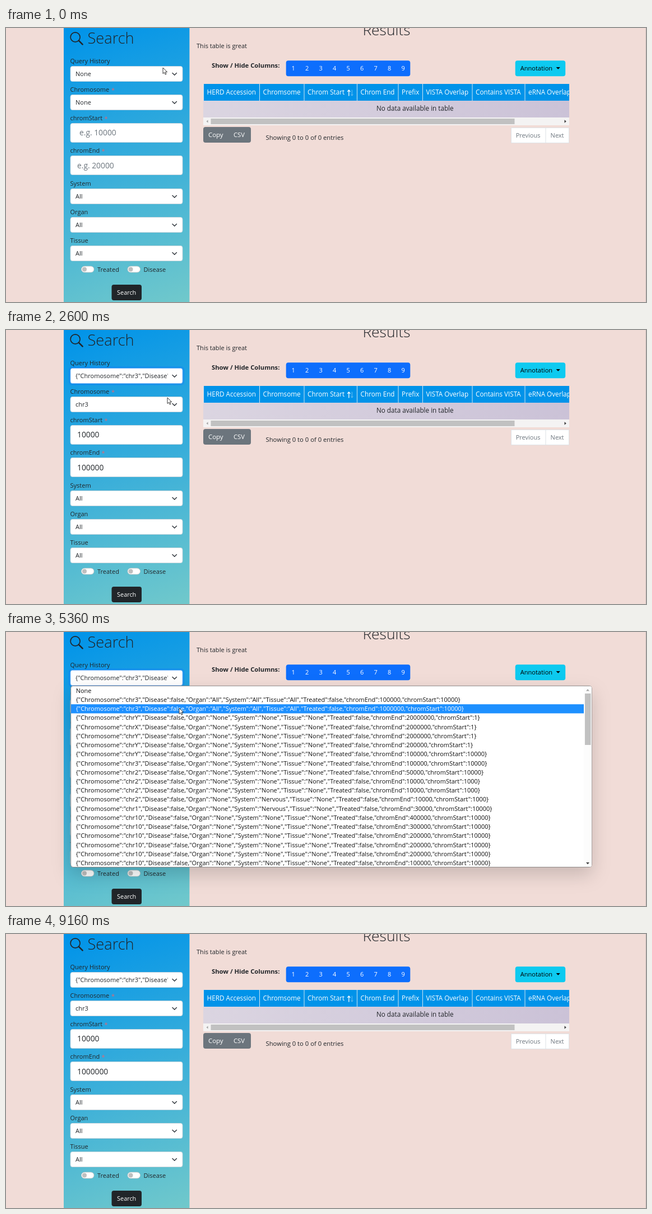
These frames come from a looping animation (1142x490 px, 9.26 s). An HTML page:

```html
<!DOCTYPE html>
<html lang="en">
<head>
<meta charset="utf-8">
<title>Search results</title>
<style>
html, body { margin: 0; width: 100%; height: 100%; overflow: hidden; background: #f1dcd7; }
svg { display: block; width: 1142px; height: 490px; font-family: "Open Sans", "Noto Sans", sans-serif; }
text { white-space: pre; }
#menuBox { filter: drop-shadow(0 13px 16px rgba(0, 0, 0, .17)); }
</style>
</head>
<body>
<svg id="stage" viewBox="0 0 1142 490">
  <defs>
    <linearGradient id="panelFill" gradientUnits="userSpaceOnUse" x1="110" y1="2" x2="317" y2="571">
      <stop offset="0" stop-color="#0093e9"/><stop offset="1" stop-color="#80d0c7"/>
    </linearGradient>
    <linearGradient id="rowFill">
      <stop offset="0" stop-color="#dbd5e1"/><stop offset="1" stop-color="#cbc2d7"/>
    </linearGradient>
    <clipPath id="tableClip"><rect x="352" y="100" width="653" height="74"/></clipPath>
    <clipPath id="valueClip"><rect x="120" y="68" width="168.5" height="28"/></clipPath>
    <clipPath id="menuClip"><rect x="116" y="97" width="929" height="323" rx="3"/></clipPath>
  </defs>
</svg>
<script>
const NS = 'http://www.w3.org/2000/svg';
const stage = document.getElementById('stage');
const INK = '#212529';
const LOOP = 9260;

function add(tag, attrs, parent = stage) {
  const el = document.createElementNS(NS, tag);
  for (const k in attrs) el.setAttribute(k, attrs[k]);
  parent.append(el);
  return el;
}
const box = (x, y, w, h, fill, more = {}, parent) =>
  add('rect', { x, y, width: w, height: h, fill, ...more }, parent);
const line = (d, stroke, width, parent) =>
  add('path', { d, fill: 'none', stroke, 'stroke-width': width, 'stroke-linecap': 'round', 'stroke-linejoin': 'round' }, parent);
const shape = (d, fill, parent) => add('path', { d, fill }, parent);
function label(str, x, y, size = 11, fill = INK, more = {}, parent) {
  const el = add('text', { x, y, 'font-size': size, fill, ...more }, parent);
  el.textContent = str;
  return el;
}
const show = (el, on) => el.setAttribute('visibility', on ? 'visible' : 'hidden');
const MID = { 'text-anchor': 'middle' };

// Search panel
box(103, -10, 224.4, 520, 'url(#panelFill)', { rx: 4 });
add('circle', { cx: 123.6, cy: 16.4, r: 8.5, fill: 'none', stroke: INK, 'stroke-width': 1.6 });
line('M130.4 23.2L136.6 29.4', INK, 2.6);
label('Search', 145.5, 28, 27.2, INK, { 'font-weight': 300 });

const glow = box(113, 66.5, 204, 31, 'none', { rx: 5, stroke: '#0d6efd', 'stroke-opacity': .25, 'stroke-width': 3 });

function field(name, y, h, star) {
  label(name, 114.5, y - 4.6);
  if (star) label('*', star, y - 4.2, 11, '#dd6878');
  return box(115, y + .5, 200, h - 1, '#fff', { rx: 3.5, stroke: '#ced4da', 'stroke-width': .8 });
}
function select(name, y, value, star) {
  const frame = field(name, y, 28, star);
  line(`M297 ${y + 12.5}l3.7 3.7 3.7-3.7`, '#343a40', 1.5);
  return { frame, text: label(value, 124, y + 18) };
}
const query = select('Query History', 68, 'None');
query.text.setAttribute('clip-path', 'url(#valueClip)');
const chrom = select('Chromosome', 119, 'None', 188).text;
field('chromStart', 170, 35, 175.5);
field('chromEnd', 228, 35, 170.5);
const startText = label('', 131, 192.4, 13.8);
const endText = label('', 127, 250.6, 13.8);
select('System', 287, 'All');
select('Organ', 338, 'All');
select('Tissue', 389, 'All');

for (const [name, x] of [['Treated', 134], ['Disease', 216.5]]) {
  box(x + .5, 426, 22.5, 11, '#fff', { rx: 5.5, stroke: '#bfbfbf', 'stroke-width': .8 });
  add('circle', { cx: x + 6, cy: 431.5, r: 4, fill: '#bfbfbf' });
  label(name, x + 29, 435.6);
}
box(188.5, 459, 53.5, 28, INK, { rx: 4 });
label('Search', 215.2, 477, 10.9, '#fff', MID);

// Results
label('Results', 679, 13, 26.4, INK, { 'font-weight': 300, ...MID });
label('This table is great', 340, 36.3, 11.05);
label('Show / Hide Columns:', 367, 71.4, 11.25, INK, { 'font-weight': 700 });
box(499.7, 58.3, 221.6, 28, '#0d6efd', { rx: 4 });
for (let i = 0; i < 9; i++) label(i + 1, 512.6 + i * 24.5, 76.2, 11, '#fff', MID);
box(908.7, 58.3, 89.5, 28, '#0dcaf0', { rx: 4 });
label('Annotation', 917.7, 76.2, 11.05, '#000');
shape('M981.5 70h7.4l-3.7 3.8z', '#000');

const table = add('g', { 'clip-path': 'url(#tableClip)' });
box(352, 100, 653, 30, '#0093e9', {}, table);
box(352, 130, 653, 30, 'url(#rowFill)', {}, table);
const columns = [['HERD Accession', 352], ['Chromsome', 452], ['Chrom Start', 531.5], ['Chrom End', 626],
  ['Prefix', 699.5], ['VISTA Overlap', 743], ['Contains VISTA', 831.5], ['eRNA Overlap', 925.5]];
for (const [name, x] of columns) {
  box(x, 100, 1, 30, '#d5e6f2', {}, table);
  label(name, x + 6.6, 119.3, 11.7, '#fff', {}, table);
}
line('M611.8 121v-10m-2.3 2.6l2.3-2.6 2.3 2.6', '#fff', 1.3, table);
line('M617.4 111v10m-1.8-2.2l1.8 2.2 1.8-2.2', '#6fbef0', 1, table);
label('No data available in table', 729.8, 148.3, 11.7, INK, MID, table);
box(352, 160, 653, 14, '#f4f3f3', {}, table);
box(365.5, 162, 542, 10, '#c1c1c1', {}, table);
shape('M360.5 164.5v5l-3-2.5z', '#a3a3a3', table);
shape('M996.5 164.3v5.4l3.4-2.7z', '#404040', table);

box(352, 177, 85, 28, '#6c757d', { rx: 4 });
label('Copy', 361, 195.3, 11.4, '#fff');
label('CSV', 406, 195.3, 11.2, '#fff');
label('Showing 0 to 0 of 0 entries', 463.5, 199.7, 11.25);
box(901.5, 178.5, 103, 27, '#fff', { stroke: '#dee2e6' });
box(962.5, 178, 1, 28, '#dee2e6');
label('Previous', 909.7, 196.3, 11, '#6c757d');
label('Next', 971.6, 196.3, 11, '#6c757d');
box(1141, 0, 1, 490, '#d8c6c2');

// History menu
const entry = (chr, kind, end, start, system = kind) =>
  `{"Chromosome":"chr${chr}","Disease":false,"Organ":"${kind}","System":"${system}","Tissue":"${kind}",` +
  `"Treated":false,"chromEnd":${end},"chromStart":${start}}`;
const plain = (chr, end, start, system) => entry(chr, 'None', end, start, system);
const options = ['None',
  entry(3, 'All', 1e5, 1e4), entry(3, 'All', 1e6, 1e4),
  plain('Y', 2e7, 1), plain('X', 2e6, 1), plain('Y', 2e6, 1), plain('Y', 2e5, 1),
  plain('Y', 1e5, 1e4), plain(3, 1e5, 1e4), plain(2, 5e4, 1e4), plain(2, 1e4, 1e3), plain(2, 1e4, 1e3),
  plain(2, 1e4, 1e3, 'Nervous'), plain(1, 3e4, 1e4, 'Nervous'),
  ...[4, 3, 2, 2, 2, 1].map(n => plain(10, n * 1e5, 1e4))];
const PITCH = 16.22;
const MENU_TOP = 96.8;
const menu = add('g', {});
box(115.7, 96.4, 929.5, 324.1, '#fff', { id: 'menuBox', rx: 4, stroke: '#858080', 'stroke-width': .9 }, menu);
const list = add('g', { 'clip-path': 'url(#menuClip)' }, menu);
const bar = box(116, MENU_TOP, 915, PITCH, '#1e90ff', {}, list);
const items = options.map((s, i) => label(s, 124.7, 108.8 + i * PITCH, 10.95, '#111', {}, list));
box(1031, 96.5, 14, 324, '#fcfcfc', {}, list);
box(1033, 110, 10.5, 92, '#c1c1c1', {}, list);
shape('M1035 105.5h6l-3-3.4z', '#a3a3a3', list);
shape('M1035 412h6l-3 3.4z', '#404040', list);

// Pointer
const ring = add('circle', { cx: 1, cy: 1.3, r: 6.5, fill: 'none', stroke: '#333', 'stroke-width': 1 });
const arrow = add('path', { d: 'M0 0V10.6L2.5 8.4 4.2 12.2 6 11.4 4.3 7.7H7.6Z', fill: '#fff', stroke: '#222', 'stroke-width': .9 });
const beam = line('M-2.5-7h5M0-7V7M-2.5 7h5', '#222', 1);

// time, x, y, kind (a: arrow, i: text beam, empty: none)
const path = [
  [0, 280, 71, 'a'], [150, 277, 80, 'a'], [300, 275.5, 83.5, 'a'],
  [770, 276, 88, 'a'], [920, 279, 97, 'a'], [1070, 281, 104, 'a'], [1220, 283, 108, 'a'],
  [1990, 286, 117, 'a'], [2140, 288, 121, 'a'],
  [3530, 291, 108, 'a'], [3680, 293, 98, 'a'], [3830, 294, 92, 'a'], [3980, 295, 88, 'a'],
  [4450, 296.5, 95, 'a'], [4600, 298.5, 103, 'a'], [4750, 300, 109, 'a'], [4900, 302, 117, 'a'],
  [5060, 304, 124, 'a'], [5210, 307, 131, 'a'], [5360, 309, 136, 'a'],
  [6730, 318, 150, 'a'], [6880, 341, 185, 'a'], [7030, 320, 215, 'a'], [7180, 270, 240, 'i'],
  [7340, 215, 247, 'i'], [7490, 202, 246, 'i'], [7640, 221, 237, 'i'], [7790, 230, 236, 'i'],
  [8100, 300, 270, 'a'], [8250, 430, 330, 'a'], [8400, 590, 390, 'a'], [8550, 765, 438, 'a'], [8700, 0, 0, '']];

const within = (t, ...spans) => spans.some(([a, b]) => t >= a && t < b);

function draw(t) {
  const [, x, y, kind] = path.findLast(p => p[0] <= t);
  const at = `translate(${x} ${y})`;
  for (const el of [ring, arrow, beam]) el.setAttribute('transform', at);
  show(arrow, kind === 'a');
  show(beam, kind === 'i');
  show(ring, within(t, [300, 450], [2450, 2600], [3980, 4130], [5820, 5970]));

  const open = within(t, [300, 2600], [3980, 5970]);
  show(menu, open);
  const picked = t < 2600 ? 0 : t < 5970 ? 1 : 2;
  const hover = y < 96 ? picked : Math.min(2, Math.floor((y - MENU_TOP) / PITCH));
  bar.setAttribute('y', MENU_TOP + hover * PITCH);
  items.forEach((el, i) => el.setAttribute('fill', i === hover ? '#fff' : '#111'));

  const focus = within(t, [450, 8100]);
  show(glow, focus);
  query.frame.setAttribute('stroke', focus ? '#86b7fe' : '#ced4da');
  query.text.textContent = options[picked];
  chrom.textContent = picked ? 'chr3' : 'None';
  startText.textContent = picked ? '10000' : 'e.g. 10000';
  startText.setAttribute('x', picked ? 127 : 131);
  endText.textContent = !picked ? 'e.g. 20000' : t < 6120 ? '100000' : '1000000';
  for (const el of [startText, endText]) el.setAttribute('fill', picked ? INK : '#6c757d');
}

const origin = performance.now();
function tick() {
  draw((performance.now() - origin) % LOOP);
  requestAnimationFrame(tick);
}
tick();
</script>
</body>
</html>
```
